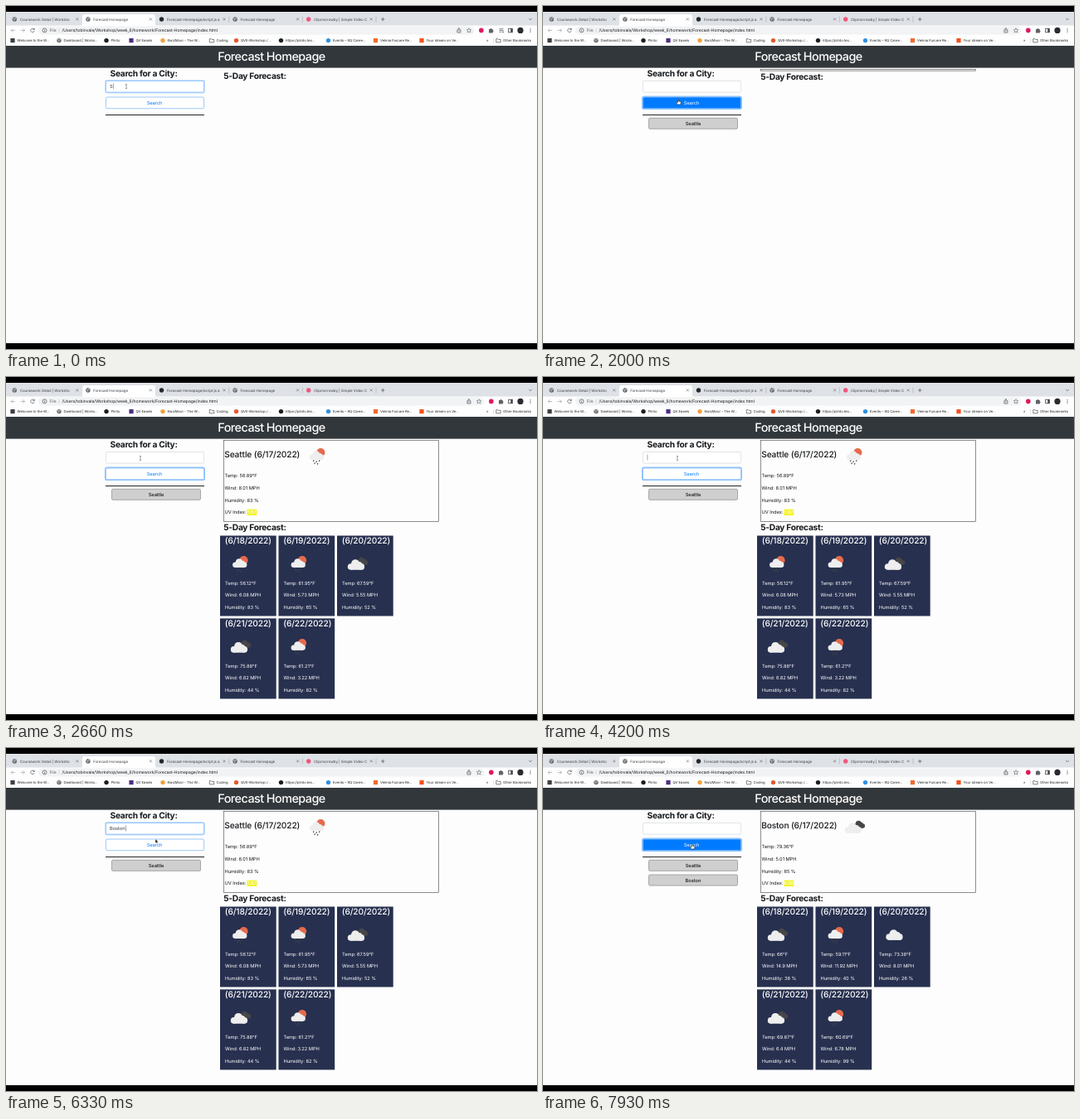
Write an HTML page that moves like this. It is 640x414 px and loops after 8 s.

```html
<!DOCTYPE html>
<html lang="en">
<head>
<meta charset="utf-8">
<title>Forecast Homepage</title>
<style>
  html, body { margin: 0; width: 100%; height: 100%; overflow: hidden; background: #fdfdfd; }
  svg { display: block; width: 100vw; height: 100vh; }
  text { font-family: Inter, "Liberation Sans", sans-serif; font-size: 5.75px; letter-spacing: -.01em;
         fill: #16191c; text-rendering: geometricPrecision; white-space: pre; }
  .title { font-size: 14.4px; font-weight: 500; letter-spacing: -.038em; fill: #fff; }
  .head { font-size: 10.2px; font-weight: 700; letter-spacing: -.028em; }
  .date { font-size: 10.2px; font-weight: 500; letter-spacing: -.013em; }
  .card { fill: #fff; }
  .tab { font-size: 4.45px; fill: #3c4043; }
  .mark { font-size: 4.2px; fill: #1d1f21; }
  .url { font-size: 5px; letter-spacing: 0; }
  .mid { text-anchor: middle; }
  .line { fill: none; stroke: #5f6368; stroke-width: .8; }
</style>
</head>
<body>
<svg viewBox="0 0 640 414">
  <defs>
    <g id="cloud">
      <circle cx="-6.3" cy="2.3" r="3.8"/><circle cx="-.8" cy="-1.4" r="5.1"/>
      <circle cx="6.3" cy="2.2" r="3.9"/><circle cx="3.8" cy="-.3" r="3.4"/>
      <rect x="-6.3" y="0" width="12.6" height="6.1"/>
    </g>
    <g id="globe">
      <circle r="2.7" fill="#5f6368"/>
      <path d="M-2 -.8Q-.6 -1.2 -.2 0T-.8 1.8M.4-2Q.4-.6 1.9-.6" fill="none" stroke="#fff" stroke-width=".7"/>
    </g>
    <path id="folder" d="M-2.7-2h2l.7.8h2.7v3.4h-5.4z" class="line"/>
    <path id="ibeam" d="M-1-2.6Q0-2.6 0-2V2Q0 2.6-1 2.6M1-2.6Q0-2.6 0-2M0 2Q0 2.6 1 2.6" fill="none" stroke="#444" stroke-width=".55"/>
    <path id="arrow" d="M0 0V5.2L1.2 4.1 2 5.9 2.9 5.5 2.1 3.8H3.7Z" fill="#111" stroke="#fff" stroke-width=".4"/>
    <path id="hand" d="M-.9-2.6q.6-.8 1.1 0v1.6l2.2.6q.6.3.5 1.1l-.5 2.2H-1.1L-2.8.7q0-.9.8-.6l1.1.6z" fill="#fff" stroke="#222" stroke-width=".6"/>
  </defs>
  <g id="chrome"></g>
  <g id="page"></g>
</svg>
<script>
const LOOP = 8000;
const rect = (x, y, w, h, fill, more = '') =>
  `<rect x="${x}" y="${y}" width="${w}" height="${h}" fill="${fill}" ${more}/>`;
const dot = (x, y, r, fill) => `<circle cx="${x}" cy="${y}" r="${r}" fill="${fill}"/>`;
const text = (x, y, s, cls = '', more = '') => `<text x="${x}" y="${y}" class="${cls}" ${more}>${s}</text>`;
const line = (d, more = '') => `<path d="${d}" class="line" ${more}/>`;
const use = (id, x, y, more = '', scale = 1) =>
  `<use href="#${id}" transform="translate(${x} ${y}) scale(${scale})" ${more}/>`;
const stroke = (color, width = 1) => `stroke="${color}" stroke-width="${width}"`;

// An icon is a shared symbol or a colour; a leading "[" makes it square
const icon = (kind, x, y) =>
  kind === 'globe' || kind === 'folder' ? use(kind, x, y)
  : kind[0] === '[' ? rect(x - 2.6, y - 2.6, 5.2, 5.2, kind.slice(1)) : dot(x, y, 2.7, kind);

const tabs = [
  ['globe', 'Coursework Detail | Worksho'],
  ['globe', 'Forecast Homepage'],
  ['#24292e', 'Forecast-Homepage/script.js a'],
  ['globe', 'Forecast Homepage'],
  ['#f0567a', 'Clipmorrowby | Simple Video C']
];
const marks = [
  [8, '[#3c4043', 'Welcome to the W...'], [64, 'globe', 'Dashboard | Works...'],
  [121, '#1b1f23', 'Plinto'], [151, '[#4b2e83', 'QV Easels'],
  [189, '#f2a03d', 'KwizMoor - The W...'], [248, 'folder', 'Coding'],
  [277.5, '#e8562c', 'QVE-Workshop /...'], [331.5, '#1b1f23', 'https://plinto.tes...'],
  [388.5, '#2f8fe0', 'Events – 9Q Caree...'], [445.5, '[#f26a2e', 'Velmia Furcare Re...'],
  [501, '[#f4501e', 'Your stream on Ve...'], [593.5, 'folder', 'Other Bookmarks']
];

function drawChrome() {
  let s = rect(0, 0, 640, 7, '#000') + rect(0, 407, 640, 7, '#000') +
    rect(0, 7, 640, 17, '#dee1e6') + rect(0, 23.5, 640, 24.5, '#fefefe') +
    '<path d="M90 24Q92 24 92 22V13Q92 10 95 10H177Q180 10 180 13V22Q180 24 182 24Z" fill="#fefefe"/>';
  tabs.forEach(([kind, name], i) => {
    const x = 10.3 + i * 88.6;
    s += icon(kind, x, 16) + text(x + 6.4, 17.7, name, 'tab') +
      line(`M${x + 74} 14.4l3 3m0-3l-3 3`, 'style="stroke-width:.6"');
    if (i > 1) s += line(`M${x + 81.3} 12.5v7`, 'style="stroke:#9a9ea3;stroke-width:.5"');
  });
  s += line('M452 16h4.4M454.2 13.8v4.4M630.2 15l1.8 1.8 1.8-1.8');
  s += line('M11 29.5H6.2m2-2.1l-2.1 2.1 2.1 2.1M17.5 29.5h4.8m-2-2.1l2.1 2.1-2.1 2.1', 'opacity=".5"') +
    line('M34 28.2A2.3 2.3 0 1 0 34.2 30.2M34.3 26.7v1.8h-1.8');
  marks.forEach(([x, kind, name]) => s += icon(kind, x, 41.6) + text(x + 5.6, 43, name, 'mark'));
  s += text(579, 43, '»', 'mark') + line('M587.5 39v6', 'style="stroke:#ccc;stroke-width:.5"');
  s += rect(0, 48, 640, 26.6, '#32373b') + text(320, 65.6, 'Forecast Homepage', 'title mid');
  s += text(125.5, 84.9, 'Search for a City:', 'head') + rect(120, 131, 119, 1, '#222');
  document.getElementById('chrome').innerHTML = s;
}

function toolbar(media) {
  const dx = media ? -12 : 0, x = n => n + dx;
  return rect(39, 24.6, x(537), 10, '#f1f3f4', 'rx="5"') +
    line('M46.5 29v1.8M46.5 27.8v.6') + '<circle cx="46.5" cy="29.4" r="2.5" class="line"/>' +
    text(52.4, 31.2, 'File', 'url', 'style="fill:#5f6368"') + line('M64 27v5', 'style="stroke:#bbb;stroke-width:.5"') +
    text(67.5, 31.2, '/Users/tobinvale/Workshop/week_6/homework/Forecast-Homepage/index.html', 'url') +
    line(`M${x(556.8)} 28.6h-.9v3.4h4v-3.4h-.9M${x(557.9)} 30.5v-4m-1.1 1.1l1.1-1.1 1.1 1.1`) +
    line(`M${x(570)} 26.7l.8 1.8 2 .2-1.5 1.3.5 2-1.8-1.1-1.8 1.1.5-2-1.5-1.3 2-.2z`, 'style="stroke-width:.6"') +
    dot(x(584.8), 29.4, 2.8, '#e0195a') +
    `<path d="M${x(594)} 28h1.4a1.1 1.1 0 0 1 2.2 0h1.2v1.3a1.1 1.1 0 0 1 0 2.1v1h-4.8z" fill="#5f6368"/>` +
    (media ? line('M594.5 27.7h5M594.5 29.5h5M594.5 31.3h2.6') + dot(599, 31.3, .9, '#5f6368') : '') +
    rect(605.7, 27.2, 4.6, 4.6, 'none', stroke('#3c4043', .8)) + rect(608.3, 27.2, 2, 4.6, '#3c4043') +
    dot(620, 29.4, 3.6, '#2a2b31') + [27.6, 29.4, 31.2].map(y => dot(632, y, .6, '#5f6368')).join('');
}

// Weather: sky, temperature, wind, humidity
const reports = {
  Seattle: { uv: '1.87', now: ['rain', 56.89, 8.01, 83], days: [
    ['rain', 56.12, 6.08, 83], ['rain', 61.95, 5.73, 65], ['broken', 67.59, 5.55, 52],
    ['broken', 75.88, 6.82, 44], ['rain', 61.21, 3.22, 82]] },
  Boston: { uv: '8.86', now: ['broken', 79.36, 5.01, 65], days: [
    ['broken', 66, 14.9, 38], ['rain', 59.11, 11.92, 40], ['cloud', 73.38, 8.01, 26],
    ['broken', 69.87, 6.4, 44], ['rain', 60.69, 6.78, 99]] }
};

function sky(kind, x, y) {
  const light = 'fill="#eeeeef"', dark = 'fill="#464649"';
  if (kind === 'cloud') return use('cloud', x - .3, y + .8, light);
  if (kind === 'broken') return use('cloud', x + 5.4, y - 2.6, dark, .7) + use('cloud', x - 1.8, y + 1.7, light);
  const drops = [[-4.5, 5.4], [-1, 6.4], [2.5, 5.4], [-3.1, 8.4], [.5, 9]]
    .map(([a, b]) => `M${x + a} ${y + b}l-.6 1.6`).join('');
  return dot(x + 3.8, y - 3.8, 5.1, '#e66a4c') + use('cloud', x - 1, y - .2, light, .85) +
    line(drops, 'style="stroke:#464649;stroke-width:1.2"');
}

const facts = (x, y, [, temp, wind, wet], cls) =>
  [`Temp: ${temp}°F`, `Wind: ${wind} MPH`, `Humidity: ${wet} %`]
    .map((s, i) => text(x, y + i * 14.85, s, cls)).join('');

function results(city) {
  const { uv, now, days } = reports[city];
  let s = rect(262.5, 76.5, 259, 98, 'none', stroke('#333', .55)) +
    text(263.2, 97.3, `${city} (6/17/2022)`, 'date') + sky(now[0], 375.5, 95) +
    facts(263.5, 121, now, '') + text(263.5, 165.4, 'UV Index:') +
    rect(290.5, 159.6, 11.8, 7.4, '#f3f32c') + text(296.4, 165.4, uv, 'card mid');
  days.forEach((day, i) => {
    const x = 258 + i % 3 * 70.5, y = i < 3 ? 191.5 : 291.4;
    s += rect(x, y, 67.7, 97, '#27304f') + text(x + 5.8, y + 9.9, `(6/${18 + i}/2022)`, 'date card') +
      sky(day[0], x + 24.7, y + 33.5) + facts(x + 6, y + 59.1, day, 'card');
  });
  return s;
}

const smooth = p => (p = Math.min(1, Math.max(0, p)), p * p * (3 - 2 * p));
const ramp = (t, start) => smooth((t - start) / 150);

const path = [[0, 145, 97], [860, 145, 97], [1250, 158, 106], [1400, 164, 116], [1700, 164, 116],
  [2200, 163, 116], [2420, 163, 116], [2600, 162, 98], [6130, 162, 98], [6330, 180, 109.7],
  [6440, 180, 119], [LOOP, 180, 119]];

function cursor(t) {
  const i = path.findIndex(k => k[0] > t);
  const [a, x0, y0] = path[i - 1], [b, x1, y1] = path[i];
  const p = smooth((t - a) / (b - a)), x = x0 + (x1 - x0) * p, y = y0 + (y1 - y0) * p;
  return use(y < 105 ? 'ibeam' : y < 110.3 ? 'arrow' : 'hand', x, y);
}

// Word, time of each keystroke, time of submit
const typing = [['Seattle', [0, 60, 130, 330, 400, 530, 600], 1600],
  ['Boston', [5130, 5330, 5400, 5600, 5660, 5730], 6660]];

function typed(t) {
  const word = typing.find(w => t < w[2]);
  return word ? word[0].slice(0, word[1].filter(k => k <= t).length) : '';
}

const cityButton = (name, y) =>
  rect(127.5, y, 107, 13, '#cfcfcf', 'rx="1.4" ' + stroke('#969696', .8)) + text(181, y + 8.6, name, 'mid', 'font-weight="500"');

function form(t) {
  const focus = 1 - ramp(t, 1560) + ramp(t, 4205) - ramp(t, 6560);
  const ring = ramp(t, 1560) - ramp(t, 4205) + ramp(t, 6560);
  const hover = ramp(t, 1315) - ramp(t, 2490) + ramp(t, 6350);
  const caret = t < 1100 || t >= 4200 && t < 4700 || t >= 5130 && t < 6660;
  const mix = (a, b, p) => a + (b - a) * p;
  const border = `rgb(${mix(216, 128, focus)},${mix(220, 185, focus)},${mix(225, 250, focus)})`;
  const label = `rgb(${255 * hover},${mix(123, 255, hover)},255)`;
  return rect(119.9, 89.9, 119.2, 14.7, 'none', `rx="2" opacity="${focus * .22}" ` + stroke('#007bff', 1.8)) +
    rect(120.4, 90.4, 118.2, 13.7, '#fff', 'rx="1.5" ' + stroke(border, .8)) +
    text(125, 99.3, typed(t) + (caret ? '|' : ''), '', 'style="fill:#343a40"') +
    rect(119.9, 109.5, 119.2, 14.7, 'none', `rx="2" opacity="${ring * .45}" ` + stroke('#007bff', 1.8)) +
    rect(120.4, 110, 118.2, 13.7, '#fff', 'rx="1.5"') +
    rect(120.4, 110, 118.2, 13.7, '#007bff', `rx="1.5" fill-opacity="${hover}" ` + stroke('#86bbf8', .8)) +
    text(179, 119, 'Search', 'mid', `style="fill:${label}"`) +
    (t >= 1600 ? cityButton('Seattle', 135.3) : '') + (t >= 6660 ? cityButton('Boston', 153) : '');
}

function draw(now) {
  const t = now % LOOP;
  const city = t >= 6930 ? 'Boston' : t >= 2200 && t < 6660 ? 'Seattle' : '';
  const waiting = t >= 1600 && !city;
  document.getElementById('page').innerHTML = toolbar(t < 1860) + form(t) +
    (city ? results(city) : waiting ? rect(262.5, 76.5, 259, 1.6, 'none', stroke('#333', .55)) : '') +
    text(262.3, city ? 185 : waiting ? 88.8 : 88, '5-Day Forecast:', 'head') + cursor(t);
}

drawChrome();
let start;
function tick(now) {
  start ??= now;
  draw(now - start);
  requestAnimationFrame(tick);
}
draw(0);
requestAnimationFrame(tick);
</script>
</body>
</html>
```
